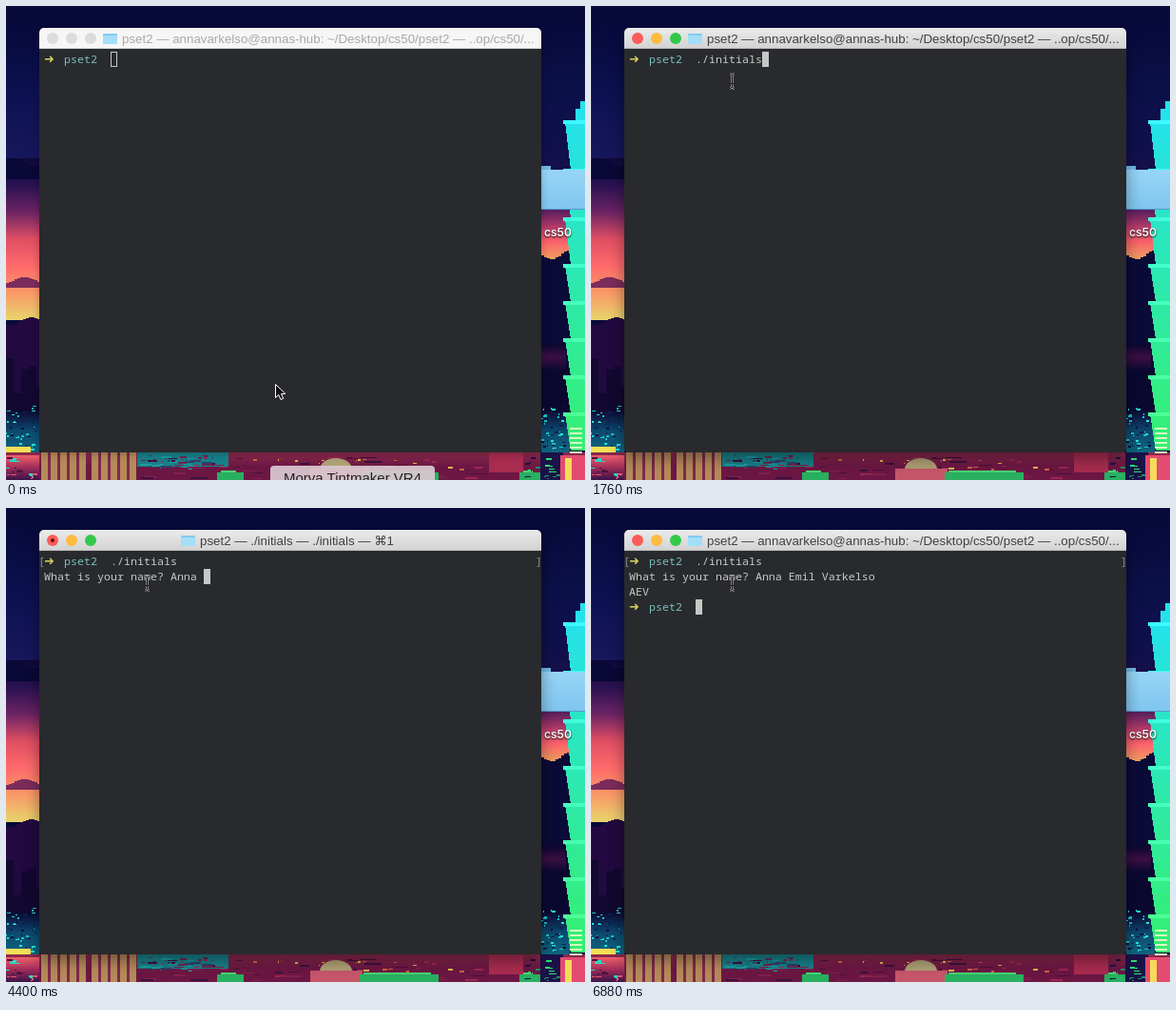
These frames come from a looping animation (609x498 px, 8000 ms). An HTML page with a canvas:

```html
<!DOCTYPE html>
<html lang="en">
<head>
<meta charset="utf-8">
<title>Terminal session</title>
<style>
html, body { margin: 0; width: 100%; height: 100%; overflow: hidden; background: #070a3b; }
#stage { position: relative; width: 609px; height: 498px; overflow: hidden; }
#stage > * { position: absolute; }
#wall { left: 0; top: 0; }
.label { left: 566px; top: 230px; font: 600 12px/16px Inter, "Open Sans", sans-serif; color: #fff; text-shadow: 0 1px 2px #000; }
.tip { left: 278px; top: 483px; width: 173px; height: 26px; border-radius: 4px; background: rgba(218, 200, 208, .93); text-align: center; font: 15px/26px "Liberation Sans", Arial, sans-serif; color: #222; }
.window, .shadow { left: 35px; top: 23px; width: 528px; height: 446px; border-radius: 5px 5px 3px 3px; }
.window { background: #282a2d; overflow: hidden; }
.shadow { box-shadow: 0 2px 8px rgba(0, 0, 0, .25); }
.active.shadow { box-shadow: 0 6px 16px rgba(0, 0, 0, .4); }
.bar { position: absolute; inset: 0 0 auto 0; box-sizing: border-box; height: 22px; background: #f6f6f6; border-bottom: 1px solid #d8d8d8; color: #a8a8a8; }
.active .bar { background: linear-gradient(#ebebeb, #d3d3d3); border-color: #b8b8b8; color: #404040; }
.dot { position: absolute; top: 5px; width: 12px; height: 12px; border-radius: 50%; background: #dcdcdc; }
.active .dot { background: var(--c); }
.busy .dot:first-child::after { content: ""; position: absolute; left: 4px; top: 4px; width: 4px; height: 4px; border-radius: 50%; background: #6b0c0a; }
.title { position: absolute; top: 0; left: 67px; white-space: pre; font: 13.3px/23px "Liberation Sans", Arial, "DejaVu Sans", sans-serif; }
.title::before { content: ""; display: inline-block; width: 15px; height: 11px; margin-right: 5px; vertical-align: -1px; border-radius: 1px; background: linear-gradient(#82cbef 2px, #a4def8 2px); }
.busy .title { left: 149px; }
.row { white-space: pre; left: 40px; height: 16px; font: 11.667px/16px "Noto Sans Mono", "DejaVu Sans Mono", monospace; color: #c8cac8; }
.arrow { display: inline-block; width: 21px; vertical-align: top; font: bold 13px/16px "DejaVu Sans", sans-serif; color: #d2cb5e; }
.dir { color: #79c0bd; }
.mark { top: 48px; font: 11.667px/16px "Noto Sans Mono", monospace; color: #8c8e8e; }
#caret { width: 7px; height: 16px; box-sizing: border-box; border: 1px solid #c6c8c6; }
#caret.active { background: #c6c8c6; }
</style>
</head>
<body>
<div id="stage">
  <canvas id="wall" width="609" height="498"></canvas>
  <div class="label">cs50</div>
  <div class="tip" id="tip">Morva Tintmaker VR4</div>
  <div class="shadow" id="shadow"></div>
  <div class="window" id="win">
    <div class="bar">
      <i class="dot" style="left:8px;--c:#fc5b57"></i>
      <i class="dot" style="left:28px;--c:#fdbc40"></i>
      <i class="dot" style="left:48px;--c:#34c84a"></i>
      <span class="title" id="title"></span>
    </div>
  </div>
  <div id="caret"></div>
  <div class="row" style="top:48px"><span class="arrow">➜</span><span class="dir">pset2</span>  <span id="cmd"></span></div>
  <div class="row" style="top:64px" id="ask"></div>
  <div class="row" style="top:80px" id="out"></div>
  <div class="row" style="top:96px" id="again"><span class="arrow">➜</span><span class="dir">pset2</span></div>
  <div class="mark" id="open" style="left:34px">[</div>
  <div class="mark" id="close" style="left:557px">]</div>
  <svg id="pointer" width="20" height="24" style="left:0;top:0;overflow:visible">
    <path id="hand" d="M.5 .5V14.5L3.8 11.5 6 16.5 8.7 15.3 6.5 10.5H11Z" fill="#111" stroke="#fff"/>
    <g id="beam" fill="none">
      <path id="bar" d="M-2.5-7Q0-7 0-5Q0-7 2.5-7M0-5V6M-2.5 8Q0 8 0 6Q0 8 2.5 8" stroke="#ccc" stroke-width="2.2" opacity=".6"/>
      <use href="#bar" stroke="#1a1a1a"/>
      <path d="M-2.5-7Q0-7 0-5Q0-7 2.5-7M0-5V6M-2.5 8Q0 8 0 6Q0 8 2.5 8M-1.5 3H1.5" stroke="#161616"/>
    </g>
  </svg>
</div>
<script>
const $ = id => document.getElementById(id);

// Wallpaper
const W = 609, H = 498, SIDE = 35, RIGHT = 563, FLOOR = 469;
const g = $('wall').getContext('2d');
const rect = (c, x, y, w, h) => { g.fillStyle = c; g.fillRect(x, y, w, h); };
let seed = 7;
const rnd = () => (seed = seed * 16807 % 2147483647) / 2147483647;
const scatter = (n, x, y, w, h, colors, long = 4) => {
  for (let i = 0; i < n; i++)
    rect(colors[i % colors.length], Math.floor(x + rnd() * w), Math.floor(y + rnd() * h),
      1 + Math.floor(rnd() * long), 1 + Math.floor(rnd() * 2));
};

// Colours spread evenly from top to bottom
function fade(x, y, w, h, ...colors) {
  const f = g.createLinearGradient(0, y, 0, y + h);
  colors.forEach((c, i) => f.addColorStop(i / (colors.length - 1), c));
  rect(f, x, y, w, h);
}

// Stepped hill or cloud outline; without a depth it reaches the ground
function ridge(color, x, w, y, rise, depth = H) {
  for (let i = 0; i < w; i += 3) {
    const lift = Math.round(rise * Math.sin(i / 7 + y));
    rect(color, x + i, y - lift, Math.min(3, w - i), depth + lift);
  }
}

function drawSky() {
  rect('#070a3b', 0, 0, W, H);
  fade(0, 20, SIDE, 140, '#070a3b', '#0c1150', '#17175c');
  fade(0, 160, SIDE, 170, '#0d0838', '#2a1252', '#6c2464', '#e04e63', '#ff6b6b', '#f99a67', '#e8d56c');
  ridge('#0a0836', 0, SIDE, 164, 4, 18);
  ridge('#7c2c5c', 0, SIDE, 288, 3, 8);
  fade(RIGHT, 20, 46, 190, '#070a3b', '#0b1048', '#10104c', '#1c104c');
  fade(RIGHT, 212, 46, 54, '#4a1a5c', '#a83768', '#fb626a', '#f0a060');
  ridge('#0b0b38', RIGHT, 46, 261, 5);
}

function drawCity() {
  ridge('#220a40', 0, SIDE, 331, 4);
  for (let x = 0; x < SIDE; x += 8) rect('#120830', x, 370 + rnd() * 40, 8, 100);
  for (let x = RIGHT; x < 595; x += 8) rect('#0b0830', x, 335 + rnd() * 60, 8, 140);
  fade(RIGHT, 355, 26, 28, '#0b0830', '#3a0f42', '#0b0830');
  for (const [x, w] of [[0, SIDE], [RIGHT, 30]]) {
    fade(x, 425, w, 44, '#0c0a34', '#0d4a70', '#0f6680');
    scatter(45, x, 420, w - 4, 46, ['#1ac2c5', '#0c2050', '#2ae3d4', '#0e0c38']);
  }
  rect('#f4df55', 0, 463, 26, 8);

  fade(0, FLOOR, W, 29, '#8c2a4c', '#6c1743', '#6c1743');
  fade(0, 472, SIDE, 26, '#f0606c', '#a02c58', '#3a1448');
  scatter(20, 0, 474, 30, 24, ['#ee5268', '#2cd7c0', '#4d1344'], 7);
  for (const x of [37, 90]) {
    rect('#b58a5a', x, FLOOR, 47, 29);
    for (let i = 7; i < 47; i += 10) rect('#7e2a48', x + i, FLOOR, 3, 29);
  }
  rect('#18808a', 138, FLOOR, 96, 15);
  scatter(34, 138, FLOOR, 84, 17, ['#1c9ca0', '#31406a', '#6c2650'], 12);
  scatter(60, 138, 474, 360, 23, ['#4a103c', '#9a2850', '#3a123e', '#7f214c'], 18);
  scatter(16, 236, 476, 250, 12, ['#d7b84c', '#cf623f'], 6);
  g.fillStyle = '#aea074';
  g.beginPath();
  g.ellipse(347, 487, 17, 12, 0, Math.PI, 0);
  g.fill();
  rect('#c5566a', 320, 486, 55, 12);
  for (const [x, w] of [[372, 83], [222, 28], [540, 22]]) {
    rect('#28b060', x, 490, w, 8);
    rect('#49d070', x + 4, 488, w - 12, 2);
  }
  rect('#a82c50', 508, FLOOR, 36, 21);
  rect('#1b1248', 562, FLOOR, 24, 29);
  scatter(20, 545, 474, 36, 23, ['#2ddc72', '#198f68', '#1b1248'], 9);
}

function drawTower() {
  const tint = (y, k = 0) => {
    const f = (y - 115) / 315;
    return `rgb(${36 + 16 * f + k},${226 + 12 * f + k},${236 - 112 * f + k})`;
  };
  rect(tint(115), 604, 100, 5, 20);
  rect(tint(115), 599, 108, 10, 12);
  const storey = i => i < 3 ? 121 + 51 * i : 272 + 39 * (i - 3);
  for (let i = 0; i < 8; i++) {
    const top = storey(i), end = storey(i + 1);
    for (let y = top; y < end; y++)
      rect(tint(y), Math.round(588 + 6 * (y - top) / (end - top)), y, 21, 1);
    rect(tint(top, 24), 586, top - 1, 23, 4);
  }
  for (let y = 443; y < 470; y += 5) rect('#d6f7c4', 593, y, 13, 2);
  rect('#e34c70', 583, 472, 26, 26);
  rect('#f5dc58', 588, 475, 7, 23);
}

function drawFolder() {
  rect('#72bce8', RIGHT, 168, 10, 6);
  fade(RIGHT, 172, 46, 42, '#97d5f6', '#7fc5ef');
  rect('#559bc8', RIGHT, 213, 46, 1);
}

drawSky();
drawCity();
drawTower();
drawFolder();

// Session
const LOOP = 8000, STEP = 80, CELL = 7;
const FOCUS = 480, ARRIVE = 640, RUN = 2560, DONE = 6800;
const QUESTION = 'What is your name? ';
const IDLE_TITLE = 'pset2 — annavarkelso@annas-hub: ~/Desktop/cs50/pset2 — ..op/cs50/...';
const BUSY_TITLE = 'pset2 — ./initials — ./initials — ⌘1';

// Bursts: start time, then pieces that appear one step apart
const COMMAND = [[1120, './'], [1440, 'i', 'n'], [1760, 'itials']];
const NAME = [[3760, ...'Ann'], [4160, 'a'], [4400, ' '], [4640, 'E'], [5200, 'm'],
  [5360, ...'il '], [5680, 'V'], [5920, ...'arke'], [6400, ...'lso']];
const typed = (bursts, t) => bursts.flatMap(([at, ...pieces]) =>
  pieces.filter((_, i) => t >= at + i * STEP)).join('');

const setText = (id, s) => { if ($(id).textContent !== s) $(id).textContent = s; };
const show = (id, on) => { $(id).style.visibility = on ? 'visible' : 'hidden'; };
const move = (id, x, y) => { $(id).style.transform = `translate(${x}px,${y}px)`; };

function render(t) {
  const active = t >= FOCUS, running = t >= RUN, done = t >= DONE;
  const busy = t >= RUN + STEP && t < DONE + STEP;
  const command = typed(COMMAND, t);
  const answer = running ? QUESTION + typed(NAME, t) : '';

  $('win').className = 'window' + (active ? ' active' : '') + (busy ? ' busy' : '');
  $('shadow').className = active ? 'shadow active' : 'shadow';
  setText('title', busy ? BUSY_TITLE : IDLE_TITLE);
  show('tip', t < STEP);

  setText('cmd', command);
  setText('ask', answer);
  setText('out', done ? 'AEV' : '');
  show('again', done);
  show('open', running);
  show('close', running);

  const row = done ? 3 : running ? 1 : 0;
  const col = done ? 10 : running ? answer.length : 10 + command.length;
  $('caret').className = active ? 'active' : '';
  move('caret', 40 + col * CELL, 48 + row * 16);

  // The pointer is already under way and slows to a stop
  const left = Math.max(0, 1 - t / ARRIVE) ** 2.4;
  move('pointer', 148.5 + 134.5 * left, 78.5 + 318.5 * left);
  show('hand', !active);
  show('beam', active);
}

const start = performance.now();
function tick() {
  const t = (performance.now() - start) % LOOP;
  render(Math.floor(t / STEP) * STEP);
  requestAnimationFrame(tick);
}
tick();
</script>
</body>
</html>
```
